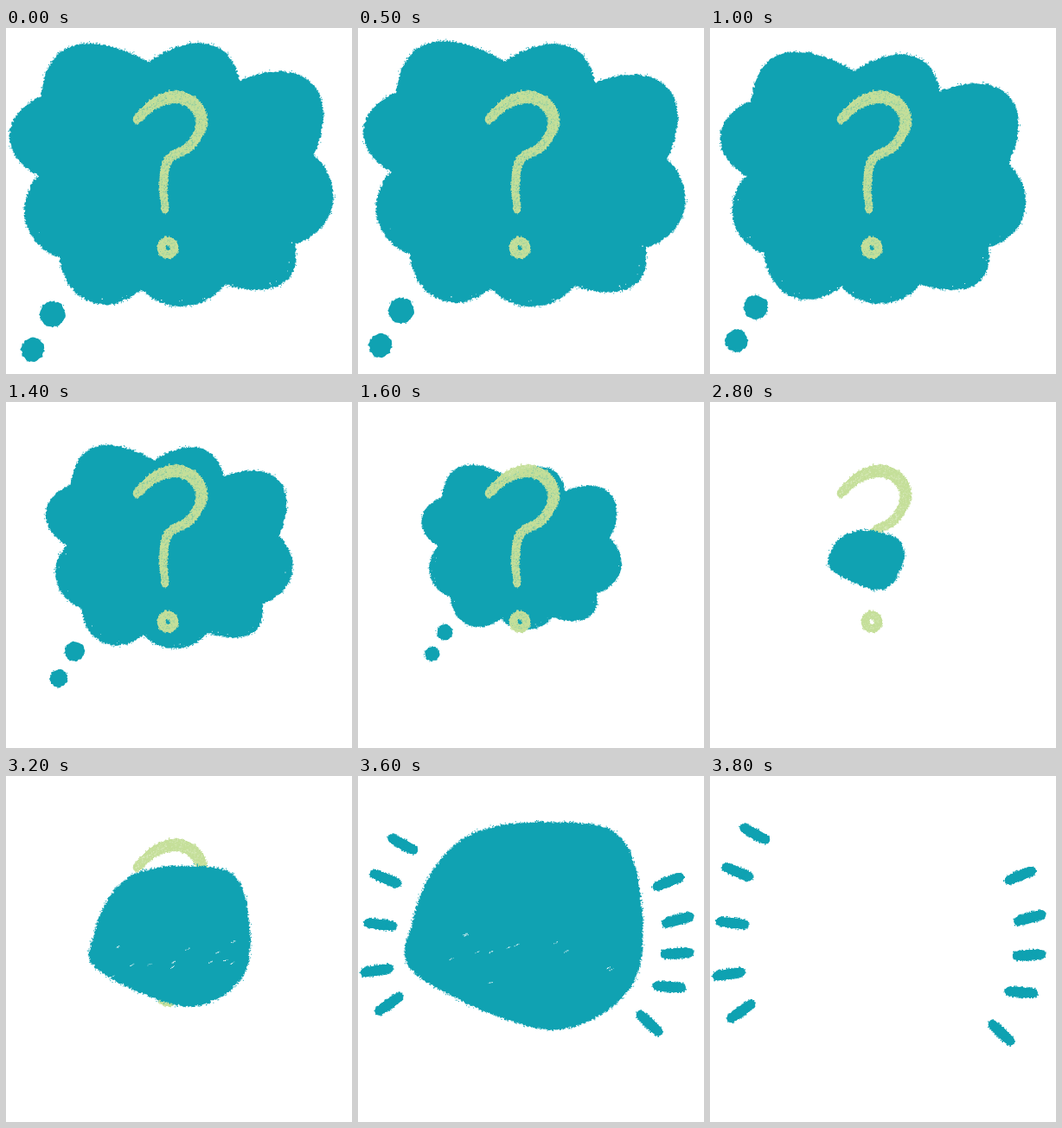
An HTML page with a canvas for the animation above (4.3 s loop, 400 px wide and 400 px high).

```html
<!DOCTYPE html>
<html lang="en">
<head>
<meta charset="utf-8">
<title>Thought bubble</title>
<style>
  html, body { margin: 0; width: 100%; height: 100%; overflow: hidden; background: #fff; }
  canvas { display: block; width: 100%; height: 100%; }
</style>
</head>
<body>
<canvas id="stage" width="400" height="400"></canvas>
<script>
const ctx = document.getElementById('stage').getContext('2d');
const TEAL = '#10a2b2', LIME = '#c5df9a', LOOP = 4300;

// Lobes run clockwise: notch x, notch y, bulge height, lean towards the notch.
const cloud = {
  anchor: [190, 200.5],
  lobes: [
    [167, 50, 32, -0.3], [266, 73, 54, 0], [345, 157, 31, 0],
    [322, 254, 29.5, 0.4], [243, 296, 21, 0], [152, 299, 33, 0],
    [63, 261, 26, 0], [42, 171, 33, 0], [48, 84, 41, 0.38]
  ],
  dots: [[53, 323, 14], [30.5, 361.5, 12.8]]
};
const pebble = {
  anchor: [180, 182.5],
  points: [[183, 148], [217, 159], [224, 182], [209, 212], [186, 216], [144, 197], [137, 180], [153, 156]],
  scratches: 0
};
const boulder = {
  anchor: [191.5, 185],
  points: [[152, 112], [208, 104], [265, 116], [282, 182], [269, 238], [206, 266], [105, 223], [103, 180], [121, 138]],
  scratches: 12
};
const hook = [[151, 106, 10], [172, 87, 13], [198, 79.5, 15.5], [220, 91, 15], [226, 112, 13],
  [212, 137, 11], [188, 152, 10], [182, 180, 10], [184, 211, 8]];
// Centre and slope in degrees.
const rays = [
  [52, 67, 28], [32, 111, 22], [26, 170, 7], [22, 229, -9], [36, 272, -35],
  [359, 115, -22], [370, 164, -16], [369, 207, -3], [360, 250, 4], [337, 297, 43]
];

function random(seed) {
  return () => {
    seed = seed + 0x6d2b79f5 | 0;
    let t = Math.imul(seed ^ seed >>> 15, 1 | seed);
    t = t + Math.imul(t ^ t >>> 7, 61 | t) ^ t;
    return ((t ^ t >>> 14) >>> 0) / 4294967296;
  };
}

// Moves a shape's anchor to x, y and scales and turns the shape around it.
function placer(anchor, [x, y, scale, turn = 0]) {
  const c = scale * Math.cos(turn), s = scale * Math.sin(turn);
  return ([px, py]) => {
    const dx = px - anchor[0], dy = py - anchor[1];
    return [x + c * dx - s * dy, y + s * dx + c * dy];
  };
}

function bezier(a, b, c, d) {
  const steps = Math.ceil(1.5 * Math.hypot(d[0] - a[0], d[1] - a[1])) + 2;
  return Array.from({ length: steps }, (_, i) => {
    const t = i / steps, u = 1 - t;
    return a.map((v, k) => u * u * u * v + 3 * u * u * t * b[k] + 3 * u * t * t * c[k] + t * t * t * d[k]);
  });
}

// Smooth curve through the points, made of Bezier pieces.
function spline(pts, closed) {
  const n = pts.length;
  const at = i => closed ? pts[(i + n) % n] : pts[Math.max(0, Math.min(n - 1, i))];
  return Array.from({ length: closed ? n : n - 1 }, (_, i) => {
    const [o, a, b, c] = [at(i - 1), at(i), at(i + 1), at(i + 2)];
    return bezier(a, a.map((v, k) => v + (b[k] - o[k]) / 6), b.map((v, k) => v - (c[k] - a[k]) / 6), b);
  }).flat();
}

function lobe([x, y, bulge, lean], i, all) {
  const [x2, y2] = all[(i + 1) % all.length];
  const dx = x2 - x, dy = y2 - y, len = Math.hypot(dx, dy);
  const control = (px, py, inward, side) => {
    const h = 4 / 3 * bulge * (1 + side * lean) / len;
    return [px + dx * inward + dy * h, py + dy * inward - dx * h];
  };
  return [[x, y], control(x, y, 0.25, 1), control(x2, y2, -0.25, -1), [x2, y2]];
}

function circle(x, y, r, steps = 40) {
  return Array.from({ length: steps }, (_, i) => {
    const a = i * 2 * Math.PI / steps;
    return [x + r * Math.cos(a), y + r * Math.sin(a)];
  });
}

function grain(g, x, y, size) {
  g.fillRect(x - size / 2, y - size / 2, size, size);
}

function roughFill(outline, jitter, rnd) {
  const shake = v => v + (rnd() - 0.5) * 2 * jitter;
  ctx.fillStyle = TEAL;
  ctx.beginPath();
  outline.forEach(([x, y]) => ctx.lineTo(shake(x), shake(y)));
  ctx.fill();
  for (const [x, y] of outline) {
    if (rnd() < 0.3) grain(ctx, shake(shake(x)), shake(shake(y)), 1);
  }
}

function drawCloud(pose) {
  const place = placer(cloud.anchor, pose), scale = pose[2], rnd = random(7);
  const jitter = 1.3 * Math.sqrt(scale);
  const outline = cloud.lobes.map(lobe).flatMap(piece => bezier(...piece.map(place)));
  roughFill(outline, jitter, rnd);
  for (const dot of cloud.dots) roughFill(circle(...dot).map(place), jitter * 0.8, rnd);
  ctx.fillStyle = '#fff';
  for (let i = 0; i < 40; i++) {
    const [x, y] = outline[Math.floor(rnd() * outline.length)];
    const pull = 0.02 + rnd() * 0.04;
    if (y > pose[1] - 20 * scale) {
      grain(ctx, x + (pose[0] - x) * pull, y + (pose[1] - y) * pull, (0.6 + rnd() * 0.7) * scale);
    }
  }
}

function drawBlob(shape, pose) {
  const rnd = random(21), [x, y, scale] = pose;
  roughFill(spline(shape.points.map(placer(shape.anchor, pose)), true), 1.5, rnd);
  ctx.fillStyle = '#fff';
  for (let i = 0; i < shape.scratches; i++) {
    const sx = x + (rnd() - 0.5) * 140 * scale, sy = y + (5 + rnd() * 45) * scale;
    for (let k = 0; k < 5; k++) grain(ctx, sx + k - rnd(), sy - k * 0.5 + rnd(), 0.5 + rnd() * 0.7);
  }
}

// Crayon line: solid core with loose grains along its edge.
function crayon(g, path, color, rnd) {
  g.fillStyle = color;
  for (const [x, y, w] of path) {
    g.beginPath();
    g.arc(x, y, w * 0.43, 0, 2 * Math.PI);
    g.fill();
    for (let i = 0; i < 4; i++) {
      const a = rnd() * 2 * Math.PI, r = w * (0.38 + 0.17 * rnd());
      grain(g, x + r * Math.cos(a), y + r * Math.sin(a), 1 + rnd() * 0.5);
    }
  }
}

const question = document.createElement('canvas');
question.width = question.height = 400;
{
  const g = question.getContext('2d'), rnd = random(5);
  const path = spline(hook), ring = circle(187, 254, 7.8).map(p => [...p, 10]);
  crayon(g, path, LIME, rnd);
  crayon(g, ring, LIME, rnd);
  g.globalCompositeOperation = 'destination-out';
  for (const [x, y, w] of [...path, ...ring]) {
    g.globalAlpha = 0.1 + rnd() * 0.25;
    for (let i = 0; i < 2; i++) grain(g, x + (rnd() - 0.5) * w, y + (rnd() - 0.5) * w, 1);
  }
}

function drawRays(squash) {
  const rnd = random(33), reach = 14.5;
  for (const [x, cy, slope] of rays) {
    const a = slope * Math.PI / 180, dx = reach * Math.cos(a), dy = reach * Math.sin(a);
    const y = 187 + (cy - 187) * squash;
    crayon(ctx, spline([[x - dx, y - dy, 11], [x, y, 13], [x + dx, y + dy, 11]]), TEAL, rnd);
  }
}

const mark = () => ctx.drawImage(question, 0, 0);
const thought = (...pose) => () => { drawCloud(pose); mark(); };
const cover = (shape, ...pose) => () => { mark(); drawBlob(shape, pose); };
const full = [195, 173, 1.48];

const scenes = [
  thought(194, 197.5, 1.054, -0.029),
  thought(194, 197.5, 1.054),
  thought(190, 200.5, 1),
  thought(189.5, 200.5, 0.902),
  thought(190, 189.5, 0.808),
  thought(190, 186, 0.654),
  thought(189.5, 170.5, 0.522),
  thought(200.5, 170, 0.4),
  thought(192, 182.5, 0.267),
  thought(189.5, 200, 0.142),
  cover(pebble, 186, 185.5, 0.47),
  cover(pebble, 180, 182.5, 1),
  cover(pebble, 188, 182, 1.57),
  cover(boulder, 191.5, 185, 1),
  cover(boulder, ...full),
  () => { drawBlob(boulder, full); drawRays(0.9); },
  () => drawRays(1)
];

// Two long holds, then a step every 200 ms; the last scene stays to the end.
function sceneAt(time) {
  if (time < 1000) return Math.floor(time / 500);
  return Math.min(scenes.length - 1, 2 + Math.floor((time - 1000) / 200));
}

let shown = -1;
const begin = performance.now();
function tick() {
  const index = sceneAt((performance.now() - begin) % LOOP);
  if (index !== shown) {
    shown = index;
    ctx.fillStyle = '#fff';
    ctx.fillRect(0, 0, 400, 400);
    scenes[index]();
  }
  requestAnimationFrame(tick);
}
tick();
</script>
</body>
</html>
```
